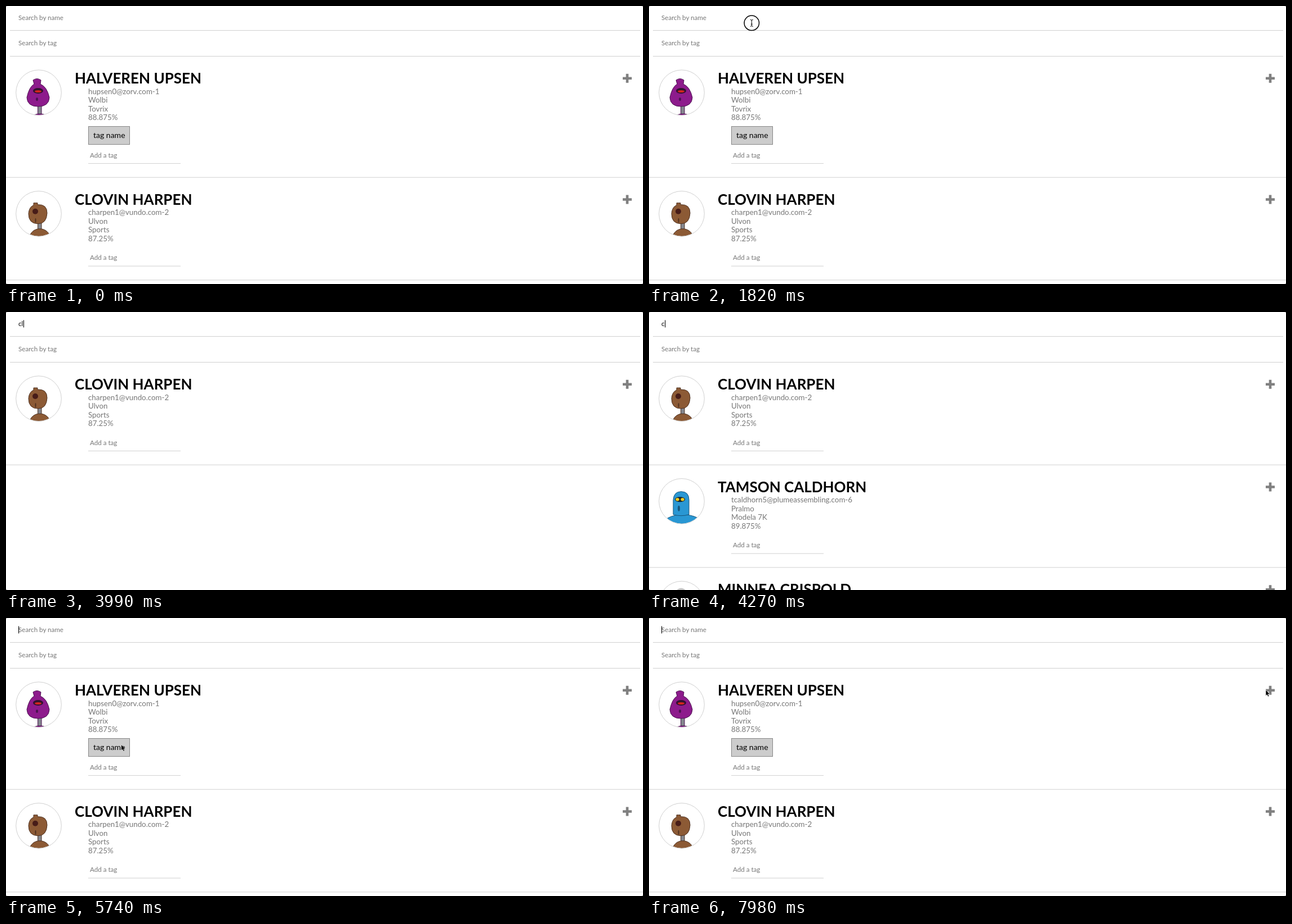
Recreate the animation shown at these times as an HTML page. Size 1131 px wide and 495 px high, loop 8 s.

```html
<!DOCTYPE html>
<html lang="en">
<head>
<meta charset="utf-8">
<title>Student search</title>
<style>
  html, body { margin: 0; width: 100%; height: 100%; overflow: hidden; background: #999; }
  svg { display: block; width: 1131px; height: 495px; font: 13.3px Lato, sans-serif; fill: #777; }
  .small { font-size: 11.6px; }
  .title { font-size: 26px; font-weight: 700; fill: #000; }
  .tag { font-size: 14px; fill: #000; }
  .rule { stroke: #d0d0d0; }
  #query { fill: #000; }
</style>
</head>
<body>
<svg viewBox="0 0 1131 495">
  <clipPath id="round"><circle cx="58" cy="154.2" r="40"/></clipPath>
  <rect width="1131" height="495" rx="3" fill="#fff"/>
  <g id="list"></g>
  <path class="rule" d="M7 43.5H1126M7 89.5H1126"/>
  <text id="hint" class="small" x="22" y="24.7">Search by name</text>
  <text id="query" class="small" x="22" y="24.7"></text>
  <text class="small" x="22" y="70.4">Search by tag</text>
  <path id="caret" d="M22.6 14.5V27.5" stroke="#000" stroke-width="1.1"/>
  <g id="cursor">
    <circle id="ring" fill="none" stroke="#000" stroke-width="1.5"/>
    <path id="beam" fill="none" stroke="#000" d="M-2.5-6Q0-6 0-4.3V4.3Q0 6-2.5 6M2.5-6Q0-6 0-4.3M2.5 6Q0 6 0 4.3M-1.5 2H1.5"/>
    <path id="arrow" fill="#000" stroke="#fff" stroke-width=".6" d="M0 0V10.5L2.4 8.4 4 12 5.9 11.2 4.3 7.6H7.4Z"/>
  </g>
</svg>
<script>
const $ = id => document.getElementById(id);
const LOOP = 8000, STEP = 70, CARD = 182.7, TAG = 33;
const FOCUS = 1890, BLINK = 1120, BLINK_ON = 420;

const ellipse = (x, y, rx, ry, extra = "") => `<ellipse cx="${x}" cy="${y}" rx="${rx}" ry="${ry}" ${extra}/>`;

// A robot: neck, shoulders (half width, height), head outline and face
const robot = (color, line, [w, h], head, face) => `
  <g fill="${color}" stroke="${line}">
    <rect x="56.5" y="168" width="6.5" height="26" fill="#85888f"/>
    ${ellipse(60, 197, w, h)}<path d="${head}"/>
  </g>${face}`;

const purple = robot("#8d1b8c", "#4b1350", [12, 5],
  "M50 139L48 132Q55 127 62 132L61 139Q73 144 77 163Q76 179 57 179Q38 179 37 163Q41 144 50 139Z",
  ellipse(57, 151, 9, 5, 'fill="#32122f"') + ellipse(57, 152, 6, 2, 'fill="#d5251f"') + ellipse(55, 166, 2, 3, 'fill="#4b1350"'));
const brown = robot("#8c5a35", "#4d3020", [18, 16],
  "M49 139V135H56V138Q73 137 73 153Q72 172 57 172Q40 172 40 154Q41 142 49 139Z",
  ellipse(52, 150, 5, 5, 'fill="#471c18"') + ellipse(52.5, 166, 1, 4, 'fill="#4d3020"'));
const blue = robot("#2997d3", "#17567c", [36, 19],
  "M43 178V152Q44 137 57 137Q71 137 71 152V178Q57 182 43 178Z",
  ellipse(55, 151, 9, 4.5, 'fill="#15252d"') + [50.5, 59.5].map(x => ellipse(x, 151, 3.2, 2.7, 'fill="#f1cc22"')).join("")
    + ellipse(53, 167, 2, 5, 'fill="#17567c"'));
const grey = ellipse(57, 150, 14, 24, 'fill="#c8c8c8"');

const people = [
  { name: "HALVEREN UPSEN", lines: ["hupsen0@zorv.com-1", "Wolbi", "Tovrix", "88.875%"], art: purple, tag: "tag name" },
  { name: "CLOVIN HARPEN", lines: ["charpen1@vundo.com-2", "Ulvon", "Sports", "87.25%"], art: brown },
  { name: "TAMSON CALDHORN", lines: ["tcaldhorn5@plumeassembling.com-6", "Pralmo", "Modela 7K", "89.875%"], art: blue },
  { name: "MINNEA CRISPOLD", lines: [], art: grey }
];

function card({ name, lines, art, tag }) {
  const drop = tag ? TAG : 0;
  const details = lines.map((s, i) => `<text x="146" y="${156.6 + i * 15.5}">${s}</text>`).join("");
  const badge = tag ? `<rect x="146.5" y="214.5" width="73" height="32" fill="#ccc" stroke="#888"/>
    <text class="tag" x="155" y="235">${tag}</text>` : "";
  return `<g>
    <g clip-path="url(#round)">${art}</g>
    <circle cx="58" cy="154.2" r="40.3" fill="none" stroke="#d0d0d0"/>
    <text class="title" x="122" y="138">${name}</text>${details}${badge}
    <text class="small" x="149" y="${236.6 + drop}">Add a tag</text>
    <path class="rule" d="M146 ${247.4 + drop}H310M0 ${272.2 + drop}H1131"/>
    <path d="M1095 128.8H1111M1103 120.8V136.8" stroke="#808080" stroke-width="4.6"/>
  </g>`;
}
$("list").innerHTML = people.map(card).join("");
const cards = [...$("list").children];

// Each entry restarts the caret's blink
const typing = [
  { at: 2100, text: "" }, { at: 2660, text: "c" }, { at: 3010, text: "cl" }, { at: 3220, text: "clo" },
  { at: 3990, text: "cl" }, { at: 4200, text: "c" }, { at: 4480, text: "" }
];
const lastKey = t => typing.findLast(key => t >= key.at) ?? typing[0];

// Pointer moves; power bends the pace: above 1 speeds up, below 1 slows down
const moves = [
  { from: 70, to: 280, x: 158.5, y: 10 },
  { from: 420, to: 700, x: 187.5, y: 37 },
  { from: 770, to: 840, x: 182.3, y: 30.3 },
  { from: 5110, to: 5810, x: 207, y: 247 },
  { from: 5880, to: 6440, x: 215, y: 240 },
  { from: 6580, to: 6930, x: 634, y: 194, power: 1.5 },
  { from: 7070, to: 7280, x: 928, y: 185 },
  { from: 7350, to: 7980, x: 1095, y: 128, power: 0.6 }
];

function pointerAt(t) {
  let x = 350, y = 490;
  for (const m of moves) {
    const k = Math.min(1, Math.max(0, (t - m.from) / (m.to - m.from))) ** (m.power ?? 1);
    x += (m.x - x) * k;
    y += (m.y - y) * k;
  }
  return [x, y];
}

const show = (el, on) => el.style.display = on ? "" : "none";
const within = (t, from, to) => t >= from && t < to;

function drawSearch(t, { at, text }) {
  $("query").textContent = text;
  show($("hint"), !text);
  show($("caret"), t >= FOCUS && (t - at) % BLINK < BLINK_ON);
  const width = text && $("query").getComputedTextLength() + 0.6;
  $("caret").setAttribute("transform", `translate(${width || 0} 0)`);
}

function drawList(filter) {
  let y = 0;
  people.forEach(({ name, tag }, i) => {
    const match = name.toLowerCase().includes(filter);
    show(cards[i], match && y < 380);
    if (!match) return;
    cards[i].setAttribute("transform", `translate(0 ${y})`);
    y += CARD + (tag ? TAG : 0);
  });
}

function drawPointer(t) {
  const [x, y] = pointerAt(t);
  const overInput = y < 90;
  show($("cursor"), within(t, 140, 2660) || t >= 5180); // hidden while typing
  $("cursor").setAttribute("transform", `translate(${x} ${y})`);
  show($("beam"), overInput);
  show($("arrow"), !overInput);
  show($("ring"), within(t, 840, 1120) || within(t, 1820, 2030));
  $("ring").setAttribute("r", t < 910 ? 18 : 13.2);
}

function draw() {
  const t = Math.floor(performance.now() % LOOP / STEP) * STEP;
  const key = lastKey(t);
  drawSearch(t, key);
  drawList(key.text && lastKey(t - STEP).text); // results follow a keystroke one step later
  drawPointer(t);
  requestAnimationFrame(draw);
}
draw();
</script>
</body>
</html>
```
